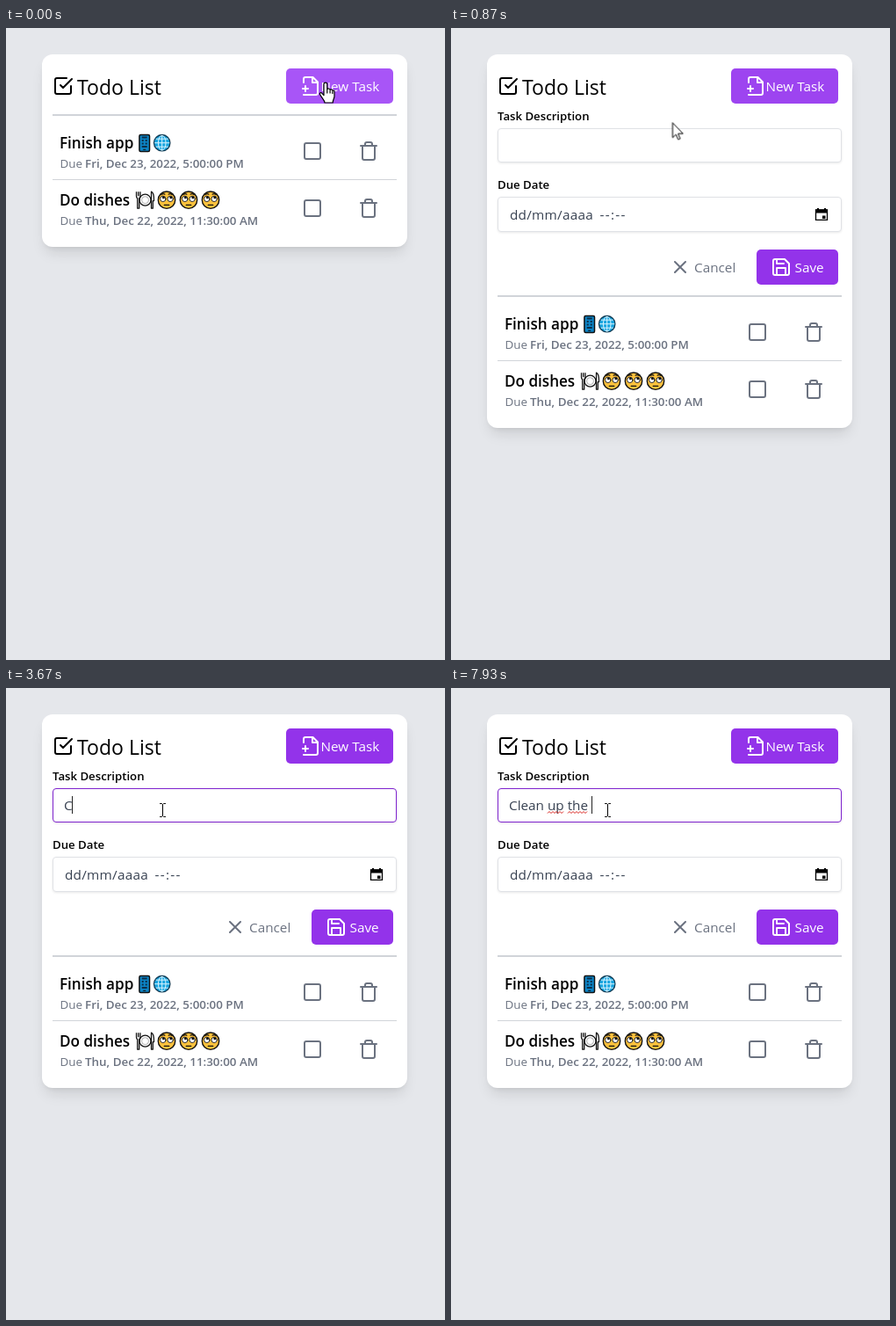
An HTML page for the animation above (8000 ms loop, 500 px wide and 719 px high).

```html
<!DOCTYPE html>
<html lang="en">
<head>
<meta charset="utf-8">
<title>Todo List</title>
<style>
  html, body { margin: 0; width: 100%; height: 100%; overflow: hidden; background: #e5e7eb; }
  .card {
    position: absolute; left: 41px; top: 30px; width: 416px; height: 425px;
    border-radius: 12px; background: #fff;
    box-shadow: 0 10px 15px -3px rgba(0,0,0,.1), 0 4px 6px -4px rgba(0,0,0,.1);
    animation: grow 8s step-end infinite;
  }
  svg.scene { position: absolute; left: 0; top: 0; width: 500px; height: 719px; }
  text { font: 15.3px "Open Sans", "Noto Sans", sans-serif; white-space: pre; }
  .title { font-size: 23px; }
  .label { font-size: 13.2px; font-weight: 600; }
  .task { font-size: 17.1px; font-weight: 600; }
  .due { font-size: 13.4px; fill: #6b7280; }
  .due tspan { font-weight: 600; }
  .typed, .date { fill: #374151; }
  .icon { fill: none; stroke: currentColor; stroke-width: 2; stroke-linecap: round; stroke-linejoin: round; }
  .gray { color: #6b7280; }
  .white { color: #fff; fill: #fff; }
  .field { fill: #fff; stroke: #e0e2e6; filter: drop-shadow(0 1px 1px rgba(0,0,0,.09)); }

  .list { animation: drop 8s step-end infinite; }
  .form { animation: reveal 8s step-end infinite; }
  .new { animation: press 8s linear infinite; }
  .focus { animation: focus 8s linear infinite; }
  .pointer { animation: travel 8s linear infinite; }
  .hand { animation: hand 8s step-end infinite; }
  .arrow { animation: arrow 8s step-end infinite; }
  .beam { animation: beam 8s step-end infinite; }

  @keyframes grow { 0% { height: 219px; } 3.37%, 100% { height: 425px; } }
  @keyframes drop { 0% { transform: none; } 3.37%, 100% { transform: translateY(206px); } }
  @keyframes reveal { 0% { visibility: hidden; } 3.37%, 100% { visibility: visible; } }
  @keyframes press {
    0%, 2.49% { fill: #a855f7; }
    2.495%, 3.365% { fill: #6b21b0; }
    3.37% { fill: #9c4aec; }
    4.1%, 9.95% { fill: #a855f7; }
    11.8%, 100% { fill: #9333ea; }
  }
  @keyframes focus {
    0%, 13.3% { stroke: #e0e2e6; }
    15%, 100% { stroke: #7e22ce; }
  }
  @keyframes travel {
    0% { transform: translate(364px, 62px); }
    9.12% { transform: translate(364px, 62px); animation-timing-function: steps(5, start); }
    13.3%, 100% { transform: translate(178px, 139px); }
  }
  @keyframes hand { 0% { visibility: visible; } 9.94%, 100% { visibility: hidden; } }
  @keyframes arrow { 0% { visibility: hidden; } 9.94% { visibility: visible; } 11.6%, 100% { visibility: hidden; } }
  @keyframes beam { 0% { visibility: hidden; } 11.6%, 100% { visibility: visible; } }
</style>
</head>
<body>
<div class="card"></div>
<svg class="scene" viewBox="0 0 500 719">
  <defs>
    <g id="controls" class="icon gray">
      <rect x="340" y="131" width="18" height="18" rx="2"/>
      <path transform="translate(401 128)" d="M3 6h18M19 6v14a2 2 0 0 1-2 2H7a2 2 0 0 1-2-2V6M8 6V4a2 2 0 0 1 2-2h4a2 2 0 0 1 2 2v2"/>
    </g>
    <g id="face" stroke="#111" stroke-linecap="round">
      <circle r="9.7" fill="#ffc23d" stroke-width="1.4"/>
      <g fill="#fff" stroke-width=".9">
        <circle cx="-4.2" cy="-1.3" r="3.2"/><circle cx="4.2" cy="-1.3" r="3.2"/>
      </g>
      <g fill="#111" stroke="none">
        <circle cx="-3.6" cy="-2.9" r="1.5"/><circle cx="4.8" cy="-2.9" r="1.5"/>
      </g>
      <path d="M-6.2-6q2-1.6 4-.6M2.2-6.6q2-1 4 .6M-2.8 5.6h5.6" fill="none" stroke-width="1.3"/>
    </g>
  </defs>

  <path class="icon" transform="translate(53 54)" d="M9 11l3 3L22 4M21 12v7a2 2 0 0 1-2 2H5a2 2 0 0 1-2-2V5a2 2 0 0 1 2-2h11"/>
  <text class="title" x="81" y="75.5">Todo List</text>
  <rect class="new" x="319" y="46" width="122" height="40" rx="5"/>
  <g class="white">
    <path class="icon" transform="translate(335 54)" d="M4 22h14a2 2 0 0 0 2-2V7.500L14.500 2H6a2 2 0 0 0-2 2v4M14 2v6h6M3 15h6M6 12v6"/>
    <text x="358.500" y="72">New Task</text>
  </g>

  <g class="form">
    <text class="label" x="53" y="105">Task Description</text>
    <rect class="field focus" x="53.5" y="114.5" width="391" height="38" rx="3.500"/>
    <text class="typed" id="typed" x="66" y="139"></text>
    <path id="wave" fill="none" stroke="#d8201c"/>
    <rect id="caret" y="123" width="1" height="20" fill="#222"/>
    <text class="label" x="53" y="183">Due Date</text>
    <rect class="field" x="53.5" y="192.5" width="391" height="39" rx="3.500"/>
    <text class="date" x="67" y="218" letter-spacing=".25">dd/mm/aaaa</text>
    <text class="date" x="169.500" y="218" letter-spacing="1.300">--:--</text>
    <path d="M415.500 207h13v11.300h-13z" fill="none" stroke="#000" stroke-width="1.300"/>
    <path d="M415 206.400h14v4h-14zM417 205h2v2h-2zM425 205h2v2h-2zM423 213.500h3.500v3.500H423z"/>
    <path class="icon gray" transform="translate(249 260)" d="M18 6L6 18M6 6l12 12"/>
    <text x="277" y="278" fill="#6b7280">Cancel</text>
    <rect x="348" y="252" width="93" height="40" rx="5" fill="#9333ea"/>
    <g class="white">
      <path class="icon" transform="translate(364 260)" d="M19 21H5a2 2 0 0 1-2-2V5a2 2 0 0 1 2-2h11l5 5v11a2 2 0 0 1-2 2zM17 21v-8H7v8M7 3v5h8"/>
      <text x="391.500" y="278">Save</text>
    </g>
  </g>

  <g class="list">
    <path d="M53 98h392v2H53zM53 172h392v1H53z" fill="#d1d4d9"/>
    <text class="task" x="61" y="137">Finish app</text>
    <text class="due" x="61.500" y="159">Due <tspan x="90">Fri, Dec 23, 2022, 5:00:00 PM</tspan></text>
    <use href="#controls"/>
    <g transform="translate(157.700 131)">
      <rect x="-5.800" y="-9.500" width="11.600" height="19" rx="1.500" fill="#0c84c6" stroke="#111" stroke-width="1.500"/>
      <path d="M-3-6.500h6M-3-3h2M1-3h2M-3 .5h2M1 .5h2M-3 4h6" stroke="#0b2f4a" stroke-width="2"/>
      <path d="M-1.500 7.300h3" stroke="#111"/>
    </g>
    <g transform="translate(177.700 130.700)" fill="none" stroke="#d8f4ff">
      <circle r="9.200" fill="#1ba6e0" stroke="#123c55" stroke-width="1.300"/>
      <ellipse rx="4.300" ry="8.400"/>
      <path d="M0-8.500v17M-8.500 0h17M-7-4.500H7M-7 4.500H7"/>
    </g>

    <text class="task" x="61" y="202">Do dishes</text>
    <text class="due" x="61.500" y="224">Due <tspan x="90">Thu, Dec 22, 2022, 11:30:00 AM</tspan></text>
    <use href="#controls" y="65"/>
    <g transform="translate(158.500 195.700)" fill="#fff" stroke="#111" stroke-width="1.300" stroke-linejoin="round">
      <circle r="6.500"/>
      <circle r="4" stroke="#999" stroke-width=".8"/>
      <path d="M-10-9.500v5q0 2 1.200 2.500v11.500h2V-2q1.200-.5 1.200-2.500v-5M-7.800-9.500v5M7-9.500q3.200 1 3 10.500H8.800v8.500H7z"/>
    </g>
    <use href="#face" x="183" y="195.700"/>
    <use href="#face" x="208" y="195.700"/>
    <use href="#face" x="233" y="195.700"/>
  </g>

  <g class="pointer" stroke-linejoin="round" stroke-linecap="round">
    <path class="hand" fill="#fff" stroke="#000" stroke-width="1.200" d="M-2 2c0-2.600 3.800-2.600 3.800 0v6c.4-1.500 3-1.400 3.300.5 .6-1.200 2.600-.8 2.800.8 .7-1 2.100-.4 2.100 1.200v5c0 2.500-1.600 3.500-1.800 7.500H-1c0-3-3.300-5.300-5.500-9.500-.8-1.600 1.200-2.700 2.500-1.200l2 2.200zM1.800 8v4M5.100 9v3M7.900 10v2.500"/>
    <path class="arrow" fill="#fff" stroke="#000" d="M0 0v16.500l3.800-3.600 2.500 5.800 2.400-1-2.500-5.700h5.300z"/>
    <path class="beam" fill="none" stroke="#000" d="M-2.500-7.500h2l1 1 1-1h2M.5-6.500v13M-2.500 7.500h2l1-1 1 1h2"/>
  </g>
</svg>
<script>
  const LOOP = 8000, BLINK = 533, FOCUSED = 1065, LEFT = 66;
  const phrase = "Clean up the ";
  const keyTimes = [3670, 3800, 3870, 4070, 4130, 4330, 4530, 4730, 4870, 5000, 5130, 7730, 7930];
  // Spelling marks: [from, to, first letter, end letter]
  const marks = [[4930, LOOP, 6, 8], [6130, 7730, 9, 11], [7930, LOOP, 9, 12]];

  const [typed, wave, caret] = ["typed", "wave", "caret"].map(id => document.getElementById(id));
  const ctx = document.createElement("canvas").getContext("2d");
  ctx.font = '15.3px "Open Sans", "Noto Sans", sans-serif';
  const xAt = count => LEFT + ctx.measureText(phrase.slice(0, count)).width;

  function zigzag(from, to) {
    let path = `M${from} 142.5`;
    for (let x = from + 2, up = true; x <= to; x += 2, up = !up) path += `L${x} ${up ? 140.5 : 142.5}`;
    return path;
  }

  function render(t) {
    const count = keyTimes.filter(time => time <= t).length;
    const lastKey = count ? keyTimes[count - 1] : FOCUSED;
    const lit = t >= FOCUSED && (t - lastKey) % (2 * BLINK) < BLINK;
    typed.textContent = phrase.slice(0, count);
    caret.setAttribute("x", Math.floor(xAt(count)));
    caret.setAttribute("opacity", lit ? 1 : 0);
    wave.setAttribute("d", marks.filter(([from, to]) => t >= from && t < to)
      .map(([, , a, b]) => zigzag(Math.round(xAt(a)), xAt(b))).join(""));
  }

  const start = performance.now();
  function tick() {
    render((performance.now() - start) % LOOP);
    requestAnimationFrame(tick);
  }
  tick();
</script>
</body>
</html>
```
